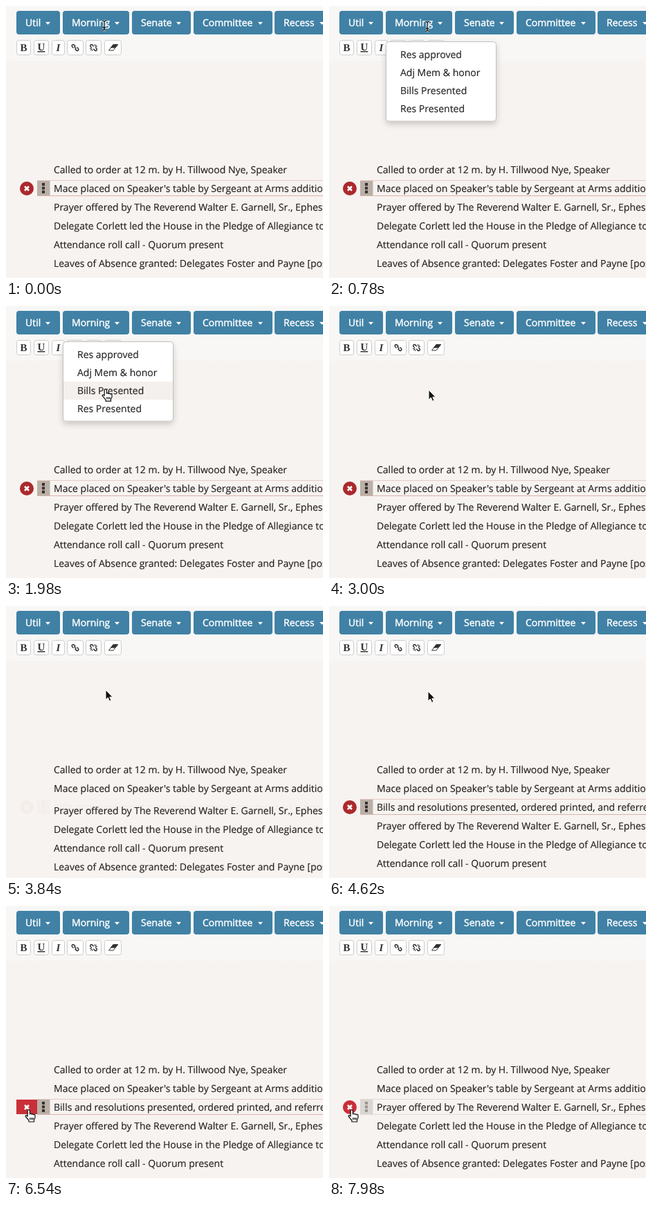
Recreate the animation shown at these times as an HTML page. Size 458 px wide and 392 px high, loop 8 s.

```html
<!DOCTYPE html>
<html lang="en">
<head>
<meta charset="utf-8">
<title>Session minutes editor</title>
<style>
  html, body { margin: 0; width: 100%; height: 100%; overflow: hidden; background: #f7f3f0; }
  svg { display: block; }
  text {
    font: 14px "Open Sans", "Noto Sans", sans-serif; text-rendering: geometricPrecision;
    fill: #23201f; stroke: #23201f; stroke-width: .15px; white-space: pre;
  }
  .nav text { fill: #fff; stroke: #fff; stroke-width: .45px; }
  .tools text { font: bold 15px "Liberation Serif", serif; fill: #333; stroke: none; }
  .tools path { fill: none; stroke: #333; stroke-width: 1.5; }
</style>
</head>
<body>
<svg id="stage" width="458" height="392" viewBox="0 0 458 392">
  <defs>
    <pattern id="weave" width="4" height="4" patternUnits="userSpaceOnUse">
      <rect width="4" height="4" fill="#f9f8f7"/>
      <path d="M0 0h1v1h-1zM2 2h1v1h-1z" fill="#f1f0ef"/>
    </pattern>
    <filter id="shadow" x="-10%" y="-10%" width="120%" height="130%">
      <feDropShadow dx="0" dy="4" stdDeviation="4" flood-opacity=".18"/>
    </filter>
  </defs>
  <rect width="458" height="392" fill="#f7f3f0"/>
  <rect width="458" height="79" fill="url(#weave)"/>
  <g class="nav" id="nav"></g>
  <g class="tools" id="tools"></g>
  <g id="list"></g>
  <g id="menu">
    <rect x="82.5" y="51.5" width="159" height="114.5" rx="4" fill="#fff" stroke="#c4c1bf" filter="url(#shadow)"/>
    <rect id="mark" x="83" width="158" height="26" fill="#f4f0ed"/>
  </g>
  <g id="cursor" stroke-linejoin="round"></g>
</svg>
<script>
const $ = id => document.getElementById(id);
const clamp = v => Math.max(0, Math.min(1, v));

function el(parent, tag, attrs, text) {
  const node = document.createElementNS("http://www.w3.org/2000/svg", tag);
  set(node, attrs);
  if (text) node.textContent = text;
  return parent.appendChild(node);
}
function set(node, attrs) {
  for (const key in attrs) node.setAttribute(key, attrs[key]);
}

// Navigation buttons
[["Util", 15, 63], ["Morning", 82, 96], ["Senate", 182, 85], ["Committee", 271, 114], ["Recess", 388, 86]]
  .forEach(([label, x, width]) => {
    el($("nav"), "rect", { x, y: 7, width, height: 34, rx: 4, fill: "#4081a5" });
    el($("nav"), "text", { x: x + 13, y: 29 }, label);
    el($("nav"), "path", { d: `M${x + width - 21} 23h7l-3.5 4z`, fill: "#fff" });
  });

// Formatting buttons
const tools = $("tools");
[[15, 21], [40, 22], [66, 19], [88, 24], [115, 23], [142, 25]].forEach(([x, width]) =>
  el(tools, "rect", { x: x + .5, y: 49.5, width: width - 1, height: 21, rx: 3, fill: "#fff", stroke: "#cfccca" }));
el(tools, "text", { x: 20.5, y: 65 }, "B");
el(tools, "text", { x: 45.5, y: 64, "text-decoration": "underline" }, "U");
el(tools, "text", { x: 72.5, y: 65, "font-style": "italic", style: "font-style:italic" }, "I");
const chain = "M-1-1.5h-3a1.8 1.8 0 0 0 0 3.6h2.5M1 1.5h3a1.8 1.8 0 0 0 0-3.6h-2.5";
el(tools, "path", { d: chain + "M-2 0h4", transform: "translate(100 60) rotate(45)" });
el(tools, "path", { d: chain, transform: "translate(126.5 60) rotate(45)" });
el(tools, "path", { d: "M121 61.5h2.5M122 64l2-2M124.5 65v-2.5M129.5 58.5h2.5M129 58l2-2M128.5 57.5v-2.5", style: "stroke-width:1" });
el(tools, "path", { d: "M148.5 64l6.5-8.5h6.5l-6.5 8.5z", style: "stroke-width:1" });
el(tools, "path", { d: "M151.5 60l3.5-4.5h6.5l-3.5 4.5z", style: "fill:#333;stroke-width:1" });

// Dropdown entries
["Res approved", "Adj Mem & honor", "Bills Presented", "Res Presented"].forEach((label, i) =>
  el($("menu"), "text", { x: 103, y: 75 + 26 * i }, label));

// Minutes
const rows = [
  "Called to order at 12 m. by H. Tillwood Nye, Speaker",
  "Mace placed on Speaker's table by Sergeant at Arms additional",
  "Bills and resolutions presented, ordered printed, and referred",
  "Prayer offered by The Reverend Walter E. Garnell, Sr., Ephesian",
  "Delegate Corlett led the House in the Pledge of Allegiance to the flag",
  "Attendance roll call - Quorum present",
  "Leaves of Absence granted: Delegates Foster and Payne [pos. 4]"
].map(label => {
  const group = el($("list"), "g", {});
  const tray = el(group, "g", {});
  const lines = [1.5, 23.5].map(y => el(tray, "path", { d: `M45 ${y}H458` }));
  const handle = el(tray, "rect", { x: 45, y: 2, width: 18.5, height: 21 });
  const dots = el(tray, "path", { d: "M52 5h4v4h-4zM52 10.5h4v4h-4zM52 16h4v4h-4z" });
  const button = el(tray, "rect", {});
  el(tray, "path", { d: "M27 10l6 6M33 10l-6 6", stroke: "#fff", "stroke-width": 2.6 });
  el(group, "text", { x: 69, y: 18 }, label);
  return { group, tray, lines, handle, dots, button };
});
const MACE = 1, BILLS = 2;

// Pointer shapes, drawn around their hot spot
const beam = "M-3-7q3 0 3 2.5V4.5q0 2.5-3 2.5M3-7q-3 0-3 2.5M3 7q-3 0-3-2.5M-2 3h4";
const pointers = {
  arrow: [["M0 0V14L3.3 11 5.6 16.2 8 15.2 5.8 10.2H10Z", "#111", "#fff", 1]],
  text: [[beam, "none", "#fff", 2.6], [beam, "none", "#111", 1.3]],
  hand: [["M-1.8 9V1.2a1.6 1.6 0 0 1 3.2 0V6a1.5 1.4 0 0 1 2.8.3a1.5 1.4 0 0 1 2.6.6a1.3 1.3 0 0 1 2.2 1V11L7.5 14V17H0V15L-4.6 9.5C-5.5 8-3.5 7-1.8 9ZM1.8 11v3M4 11v3M6 11v3", "#fff", "#111", 1.2]]
};
for (const name in pointers) {
  const group = el($("cursor"), "g", {});
  pointers[name].forEach(([d, fill, stroke, width]) =>
    el(group, "path", { d, fill, stroke, "stroke-width": width }));
  pointers[name] = group;
}

// time, x, y, easing exponent (positive eases in, negative eases out)
const track = [
  [720, 142, 28, 0], [1320, 145, 87, 1.6], [2100, 144, 121, -2],
  [4560, 144, 121, 1], [4620, 143, 123, 1], [5280, 70, 268, 1.5], [5940, 33, 294, -2]
];
function pointerAt(t) {
  const next = track.findIndex(k => k[0] > t);
  if (next === 0) return [track[0][1], track[0][2]];
  if (next < 0) return track[track.length - 1].slice(1, 3);
  const a = track[next - 1], b = track[next];
  const p = (t - a[0]) / (b[0] - a[0]);
  const e = b[3] > 0 ? p ** b[3] : 1 - (1 - p) ** -b[3];
  return [a[1] + (b[1] - a[1]) * e, a[2] + (b[2] - a[2]) * e];
}
function pointerKind(t, x, y) {
  if (t < 2940) return y < 40 ? "text" : y < 57 ? "arrow" : "hand";
  if (y < 223) return "arrow";
  return x > 63 ? "text" : "hand";
}

function drawRow(row, y, height, state) {
  const { active, hover, overButton, square, pressed } = state;
  set(row.group, { transform: `translate(0 ${y})`, opacity: (height / 27) ** 2 });
  set(row.tray, { visibility: active || hover ? "visible" : "hidden" });
  row.lines.forEach((line, i) => set(line, { stroke: !active ? "#e0dbd7" : i ? "#d9b3ad" : "#e6cbc6" }));
  set(row.handle, { fill: active ? "#bab0a7" : "#dad6d2" });
  set(row.dots, { fill: active ? "#39312d" : "#9b9590" });
  const half = 10 + 5 * square;
  set(row.button, {
    x: 30 - half, y: 3 - square, width: 2 * half, height: 20 + square, rx: 10 * (1 - square),
    fill: pressed ? "#b3272f" : overButton ? "#c92f38" : active ? "#ab292d" : "#b9a38e"
  });
}

function render(t) {
  const [x, y] = pointerAt(t);
  const kind = pointerKind(t, x, y);
  for (const name in pointers) set(pointers[name], { visibility: name === kind ? "visible" : "hidden" });
  set($("cursor"), { transform: `translate(${x} ${y})` });

  set($("menu"), { opacity: Math.min(clamp((t - 120) / 240), 1 - clamp((t - 2820) / 180)) });
  const item = Math.floor((y - 57) / 26);
  set($("mark"), { y: 57 + 26 * item, visibility: item >= 0 && t < 2940 ? "visible" : "hidden" });

  const grown = clamp((t - 3780) / 360) - clamp((t - 7560) / 420);
  const square = clamp((t - 6240) / 300);
  const activeRow = t < 3840 ? MACE : BILLS;
  let top = 223;
  rows.forEach((row, i) => {
    const height = i === BILLS ? 27 * grown : 27;
    const hover = t >= 4560 && y >= top && y < top + height;
    drawRow(row, top, height, {
      active: i === activeRow,
      hover,
      overButton: hover && x < 43,
      square: i === BILLS ? square : 0,
      pressed: i === BILLS && t >= 7380
    });
    top += height;
  });
}

function tick() {
  const t = performance.now() % 8000;
  render(Math.floor(t / 60) * 60);
  requestAnimationFrame(tick);
}
tick();
</script>
</body>
</html>
```
